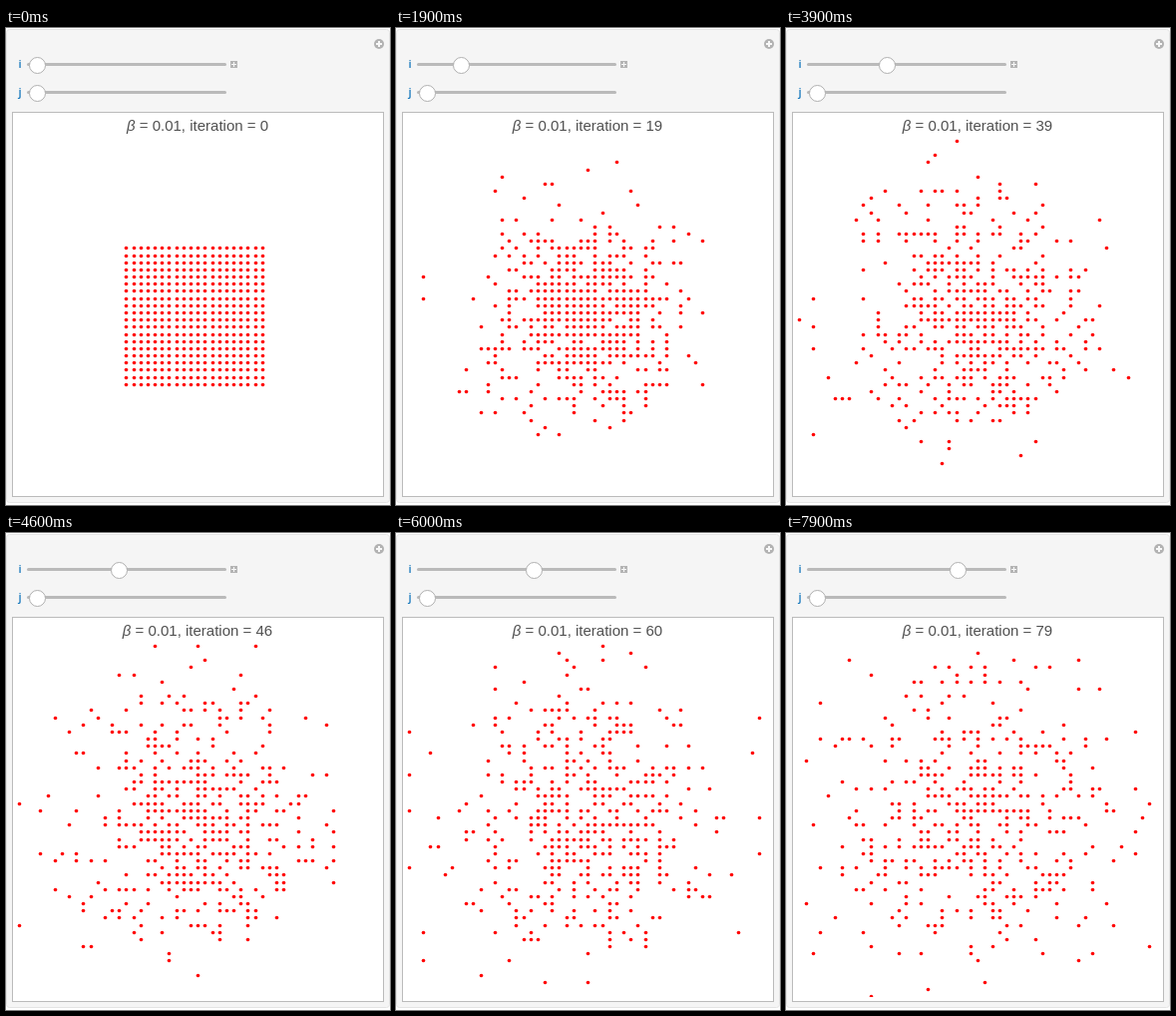
Animation, 385 px wide and 478 px high, one loop 8 s. Source, as an HTML page with a canvas:

```html
<!DOCTYPE html>
<html lang="en">
<head>
<meta charset="utf-8">
<title>Lattice diffusion</title>
<style>
html, body { margin: 0; width: 100%; height: 100%; overflow: hidden; background: #fff; }
canvas { display: block; width: 385px; height: 478px; }
</style>
</head>
<body>
<canvas id="stage" width="385" height="478"></canvas>
<script>
const ctx = document.getElementById('stage').getContext('2d');
const SIZE = 50, BLOCK = 20, START = 15, STEPS = 80, STEP_MS = 100;
const HOPS = 740; // attempted hops per iteration
const PITCH = 7.17, LEFT = 13.42, TOP = 113.42;
const TEXT = '15px "Liberation Sans", Arial, sans-serif';

function seeded(seed) {
  return () => {
    seed = (seed + 0x6D2B79F5) | 0;
    let t = Math.imul(seed ^ (seed >>> 15), 1 | seed);
    t = (t + Math.imul(t ^ (t >>> 7), 61 | t)) ^ t;
    return ((t ^ (t >>> 14)) >>> 0) / 4294967296;
  };
}

// Random walk with exclusion: a particle hops only to an empty neighbour.
function simulate() {
  const rnd = seeded(2718);
  const taken = new Uint8Array(SIZE * SIZE);
  const cells = [];
  for (let r = 0; r < BLOCK; r++) {
    for (let c = 0; c < BLOCK; c++) {
      const cell = (START + r) * SIZE + START + c;
      cells.push(cell);
      taken[cell] = 1;
    }
  }
  const states = [cells.slice()];
  while (states.length < STEPS) {
    for (let h = 0; h < HOPS; h++) {
      const k = Math.floor(rnd() * cells.length);
      const dir = Math.floor(rnd() * 4);
      const x = cells[k] % SIZE + [1, -1, 0, 0][dir];
      const y = Math.floor(cells[k] / SIZE) + [0, 0, 1, -1][dir];
      const next = y * SIZE + x;
      if (x < 0 || y < 0 || x >= SIZE || y >= SIZE || taken[next]) continue;
      taken[cells[k]] = 0;
      taken[next] = 1;
      cells[k] = next;
    }
    states.push(cells.slice());
  }
  return states;
}

const states = simulate();
const snap = v => Math.floor(v) + 0.5;

function disc(x, y, r, fill) {
  ctx.beginPath();
  ctx.arc(x, y, r, 0, 2 * Math.PI);
  ctx.fillStyle = fill;
  ctx.fill();
}

function plus(x, y, arm, width) {
  ctx.fillStyle = '#f8f8f8';
  ctx.fillRect(x - arm, y - width / 2, 2 * arm, width);
  ctx.fillRect(x - width / 2, y - arm, width, 2 * arm);
}

function slider(label, y, x) {
  ctx.font = '600 11px "Open Sans", "DejaVu Sans", sans-serif';
  ctx.textAlign = 'left';
  ctx.fillStyle = '#0f74bb';
  ctx.fillText(label, 12.5, y + 2.5);
  ctx.beginPath();
  ctx.roundRect(21, y - 2.5, 200, 3, 1.5);
  ctx.fillStyle = '#bababa';
  ctx.fill();
  disc(x, y, 8, '#fff');
  ctx.strokeStyle = '#b0b0b0';
  ctx.lineWidth = 1;
  ctx.stroke();
}

function panel() {
  ctx.fillStyle = '#fff';
  ctx.fillRect(0, 0, 385, 478);
  ctx.beginPath();
  ctx.roundRect(0.5, 1.5, 384, 474, 3);
  ctx.fillStyle = '#f5f5f5';
  ctx.fill();
  ctx.strokeStyle = '#e4e4e4';
  ctx.lineWidth = 1;
  ctx.stroke();
  disc(374, 16, 5, '#b2b2b2');
  plus(374, 16, 3, 2);
  ctx.fillStyle = '#b4b4b4';
  ctx.fillRect(225, 33, 7, 7);
  plus(228.5, 36.5, 2.5, 1);
  ctx.fillStyle = '#fff';
  ctx.fillRect(6, 84, 373, 386);
  ctx.strokeStyle = '#bbb';
  ctx.strokeRect(6.5, 84.5, 372, 385);
}

function title(n) {
  const rest = ' = 0.01, iteration = ' + n;
  const italic = 'italic ' + TEXT;
  ctx.textAlign = 'left';
  ctx.fillStyle = '#505050';
  ctx.font = italic;
  const lead = ctx.measureText('β').width;
  ctx.font = TEXT;
  const x = 192 - (lead + ctx.measureText(rest).width) / 2;
  ctx.fillText(rest, x + lead, 103);
  ctx.font = italic;
  ctx.fillText('β', x, 103);
}

function dots(cells) {
  ctx.save();
  ctx.beginPath();
  ctx.rect(7, 85, 371, 380);
  ctx.clip();
  for (const cell of cells) {
    const x = snap(LEFT + PITCH * (cell % SIZE));
    const y = snap(TOP + PITCH * Math.floor(cell / SIZE));
    disc(x, y, 1.8, '#f00');
  }
  ctx.restore();
}

function draw(ms) {
  const n = Math.floor(ms / STEP_MS) % STEPS;
  panel();
  slider('i', 37.5, Math.round(31 + n * 1.785) + 0.5);
  slider('j', 65.5, 31.5);
  title(n);
  dots(states[n]);
}

const begin = performance.now();
function tick() {
  draw(performance.now() - begin);
  requestAnimationFrame(tick);
}
tick();
</script>
</body>
</html>
```
